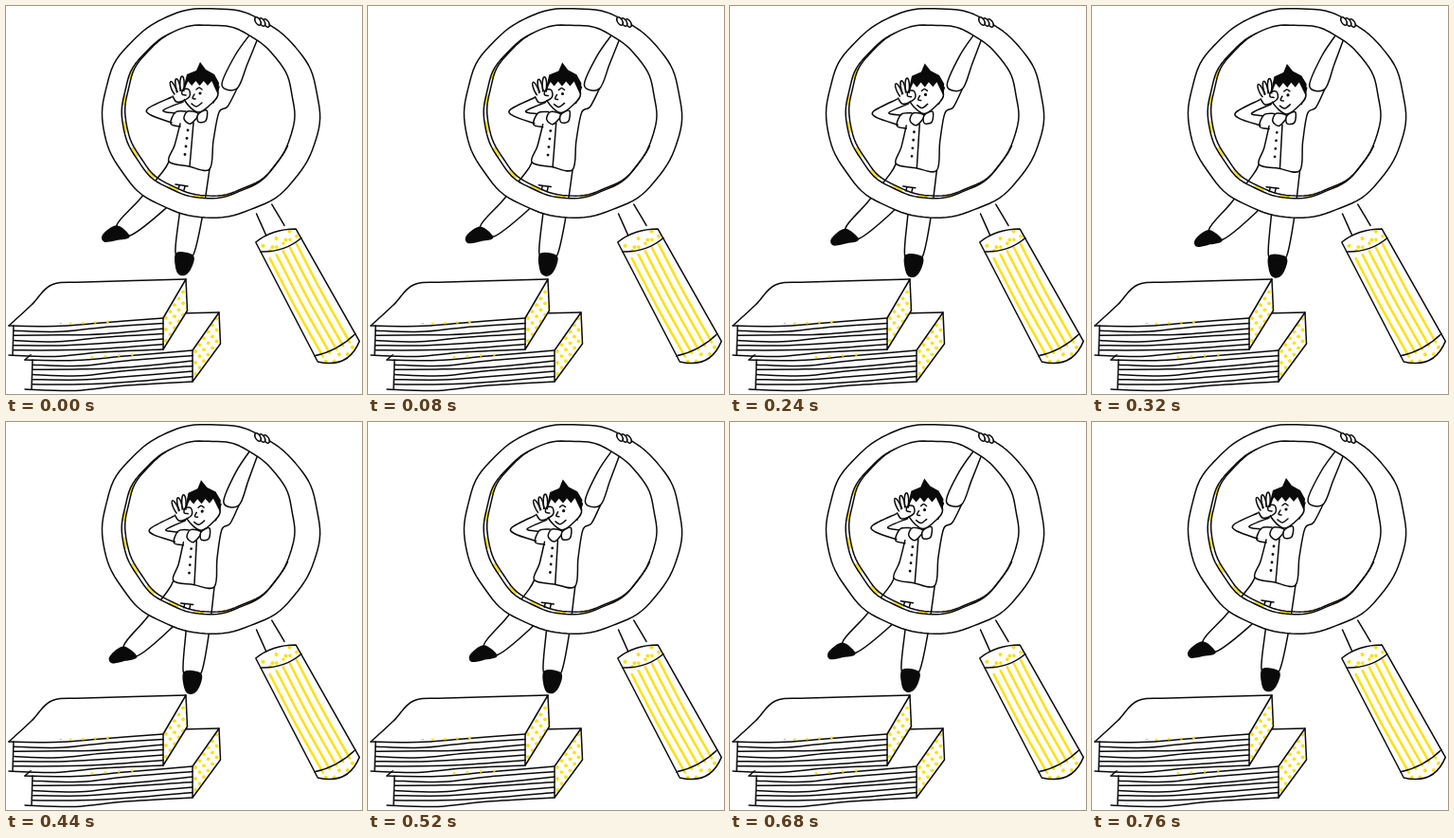
Write an HTML page with a canvas that moves like this. It is 376 by 409 pixels and loops after 800 ms.

```html
<!DOCTYPE html>
<html lang="en">
<head>
<meta charset="utf-8">
<title>Swinging under the magnifier</title>
<style>
html, body { margin: 0; width: 100%; height: 100%; overflow: hidden; background: #fff; }
canvas { display: block; width: 376px; height: 409px; }
</style>
</head>
<body>
<canvas id="stage" width="376" height="409"></canvas>
<script>
const ctx = document.getElementById('stage').getContext('2d');
const INK = '#0a0a0a', YELLOW = '#ffe010', WHITE = '#fff';
const LOOP = 800, STEP = 40, SWING = 0.04;
const PIVOT = { x: 266, y: 31 };

// Smooth path through points, using midpoints as joints
function curve(text, closed = false) {
  const pts = text.split(' ').map(p => p.split(',').map(Number));
  const n = pts.length, path = new Path2D();
  const at = i => closed ? pts[(i + n) % n] : pts[Math.max(0, Math.min(n - 1, i))];
  path.moveTo(...pts[0]);
  for (let i = 0; i < (closed ? n : n - 1); i++) {
    const [a, b, c, d] = [at(i - 1), at(i), at(i + 1), at(i + 2)];
    path.bezierCurveTo(b[0] + (c[0] - a[0]) / 6, b[1] + (c[1] - a[1]) / 6,
      c[0] - (d[0] - b[0]) / 6, c[1] - (d[1] - b[1]) / 6, ...c);
  }
  if (closed) path.closePath();
  return path;
}

function poly(...pts) {
  const path = new Path2D();
  pts.forEach(p => path.lineTo(...p));
  path.closePath();
  return path;
}

function stroke(path, width = 1.5, color = INK) {
  ctx.lineWidth = width;
  ctx.strokeStyle = color;
  ctx.stroke(path);
}

function fill(path, color = WHITE, rule = 'nonzero') {
  ctx.fillStyle = color;
  ctx.fill(path, rule);
}

const line = (text, width, color) => stroke(curve(text), width, color);

function shape(text, color = WHITE) {
  const path = curve(text, true);
  fill(path, color);
  stroke(path);
}

function oval(x, y, rx, ry, tilt = 0, color = WHITE, outlined = true) {
  const path = new Path2D();
  path.ellipse(x, y, rx, ry, tilt, 0, Math.PI * 2);
  fill(path, color);
  if (outlined) stroke(path);
}

const dot = (x, y, r, color = INK) => oval(x, y, r, r, 0, color, false);

// Hand-drawn ellipse or arc, angles in degrees
function ring(cx, cy, rx, ry, from = 0, to = 360) {
  const path = new Path2D();
  for (let deg = from; deg <= to; deg += 3) {
    const a = deg * Math.PI / 180;
    const wobble = 0.5 * Math.sin(a * 9) + 0.4 * Math.sin(a * 14 + 1);
    path.lineTo(cx + (rx + wobble) * Math.cos(a), cy + (ry + wobble) * Math.sin(a));
  }
  if (to - from === 360) path.closePath();
  return path;
}

// Staggered yellow dots inside an area
function dotted(area, x0, y0, width, height) {
  ctx.save();
  ctx.clip(area);
  for (let row = 0; row * 6 < height; row++)
    for (let x = (row % 2) * 4.5; x < width; x += 9)
      dot(x0 + x, y0 + row * 6 - x * 0.2, 1.9, YELLOW);
  ctx.restore();
}

function drawBoy() {
  // shorts, legs, shoes
  line('172,164 166,174 141,204 117,231 131,242 168,214 180,199');
  line('186,200 183,221 179,260 188,263 198,262 207,224 215,172');
  shape('117,232 103,241 104,248 118,246 130,243', INK);
  shape('180,261 181,280 189,283 196,274 197,263', INK);
  line('179,188 192,190');
  line('183,189 182,193');
  line('189,190 188,194');

  // raised arm
  line('260,27 242,52 228,83 244,87 255,61 268,29');
  line('225,85 222,94 219,102');

  // shirt
  line('244,87 234,106 225,112 219,142 215,172 193,169 172,164 178,147 184,124');
  line('198,123 196,146 194,169');
  for (let i = 0; i < 4; i++) dot(192 - i, 131 + i * 8.5, 1.4);

  // bent arm
  line('175,96 150,108 153,115 175,123');
  line('187,101 166,110 178,113');
  line('190,111 179,112 174,124 184,127');

  // head
  shape('188,88 189,100 203,112 218,102 224,92 217,76 196,75');
  const hair = [[224, 94], [225, 81], [220, 72], [211, 67], [205, 59], [201, 68], [191, 72], [187, 88]];
  for (let i = 0; i < 7; i++) hair.push([192 + i * 4.2, i % 2 ? 84 : 79]);
  fill(poly(...hair), INK);
  line('201,88 204,86 207,88');
  dot(205, 92, 1.6);
  line('199,93 197,97 200,98');
  line('196,103 201,106 207,102');
  shape('192,111 188,119 195,124 203,114');
  shape('203,114 203,122 211,121 212,110');

  // fingers round the eye
  for (let i = 0; i < 3; i++) oval(177 + i * 4.5, 87 - i * 2.5, 2.2, 8, -0.4 + i * 0.2);
  oval(184, 95, 7, 5, -0.4, WHITE, false);
  line('176,95 180,101 187,100 194,95 193,88 187,88 186,93 190,94');
}

function drawLens() {
  const rim = ring(216.5, 112.5, 114.7, 110.5);
  const edge = ring(213.5, 111, 91, 91.5);
  const glass = [216, 109, 90, 91];
  const band = new Path2D(rim);
  band.addPath(edge);
  fill(band, WHITE, 'evenodd');
  for (let deg = 58; deg <= 202; deg += 18)
    stroke(ring(214.8, 110, 90.5, 91.2, deg, deg + 6), 2.2, YELLOW);
  stroke(rim);
  stroke(edge);
  stroke(ring(...glass, 25, 240));
}

function drawHand() {
  for (let i = 0; i < 3; i++) oval(275 - i * 4.5, 18 - i, 2.6, 4.6, -0.5);
}

// Curved cross line of the handle
function bow(y, half, sag, tilt = 0) {
  const path = new Path2D();
  path.moveTo(-half, y - tilt);
  path.quadraticCurveTo(0, y + sag * 2, half, y + tilt);
  return path;
}

function drawHandle() {
  ctx.save();
  ctx.translate(285, 242);
  ctx.rotate(-0.497);
  fill(poly([-8, -30], [12, -30], [13, -2], [-9, -2]));
  line('-7,-30 -9,-4');
  line('12,-31 13,-5');

  const grip = bow(0, 22, -4, 4);
  grip.lineTo(24.5, 140);
  grip.quadraticCurveTo(0, 160, -24.5, 138);
  grip.closePath();
  fill(grip);
  ctx.save();
  ctx.clip(grip);
  for (let i = 0; i < 5; i++) {
    const x = -17 + i * 8;
    line(`${x},18 ${x - 1},76 ${x},136`, 2.5, YELLOW);
    dot(x, 3 + i % 2 * 6, 2, YELLOW);
    dot(x + 4, 11, 1.8, YELLOW);
    dot(x, 142 + i % 2 * 4, 2, YELLOW);
  }
  ctx.restore();
  stroke(grip);
  stroke(bow(11, 22.5, 4.5, 4));
  stroke(bow(131, 24.5, 3.5));
  ctx.restore();
}

// A lying book: front of pages, slanted cover, dotted side
function drawBook({ left, top, right, lift, depth, rise, height, inset }) {
  const front = top - lift, back = right + depth, far = front - rise;
  const base = front + height, floor = top + height - 2;
  const side = poly([right, front], [back, far], [back + 1.5, far + 33], [right, base]);
  const cover = poly([left, top], [left + 44, far + 6], [back, far], [right, front]);
  fill(poly([left + inset, top], [right, front], [right, base], [left + inset, floor]));
  fill(side);
  fill(cover);
  dotted(side, right + 3, far + 5, depth, rise + height);
  stroke(side);

  line(`${left},${top} ${left + 24},${top - 22} ${left + 45},${far + 6} ${left + 80},${far + 3} ${back},${far}`);
  const width = right - left;
  for (let i = 0; i <= 6; i++) {
    const t = i / 6, outer = i % 6 === 0;
    const x0 = outer ? left : left + inset, w = right - x0;
    const y0 = top + t * (floor - top), y1 = front + t * height;
    const mid = (y0 + y1) / 2, bend = Math.sin(i * 2.4);
    line(`${x0},${y0} ${x0 + w * 0.3},${y0 + 0.5 + bend} ${x0 + w * 0.6},${mid + 1 - bend} ${right},${y1}`);
  }
  line(`${left + inset},${top} ${left + inset - 1},${floor}`);
  for (let i = 0; i < 4; i++) {
    const t = 0.4 + i * 0.08;
    dot(left + width * t, top - lift * t + 1, 1.3, YELLOW);
  }
}

function drawBooks() {
  drawBook({ left: 20, top: 373, right: 197, lift: 10, depth: 28, rise: 40, height: 33, inset: 8 });
  drawBook({ left: 3, top: 337, right: 166, lift: 8, depth: 24, rise: 41, height: 33, inset: 5 });
}

// Ten steps out, nine steps back
function swingAt(time) {
  const step = Math.floor((time % LOOP) / STEP);
  return SWING * (step <= 10 ? step / 10 : (19 - step) / 9);
}

function draw(time) {
  ctx.fillStyle = WHITE;
  ctx.fillRect(0, 0, 376, 409);
  ctx.lineCap = ctx.lineJoin = 'round';
  ctx.save();
  ctx.translate(PIVOT.x, PIVOT.y);
  ctx.rotate(-swingAt(time));
  ctx.translate(-PIVOT.x, -PIVOT.y);
  drawBoy();
  ctx.restore();
  drawLens();
  drawHand();
  drawHandle();
  drawBooks();
}

let start;
function tick(now) {
  start ??= now;
  draw(now - start);
  requestAnimationFrame(tick);
}
draw(0);
requestAnimationFrame(tick);
</script>
</body>
</html>
```
